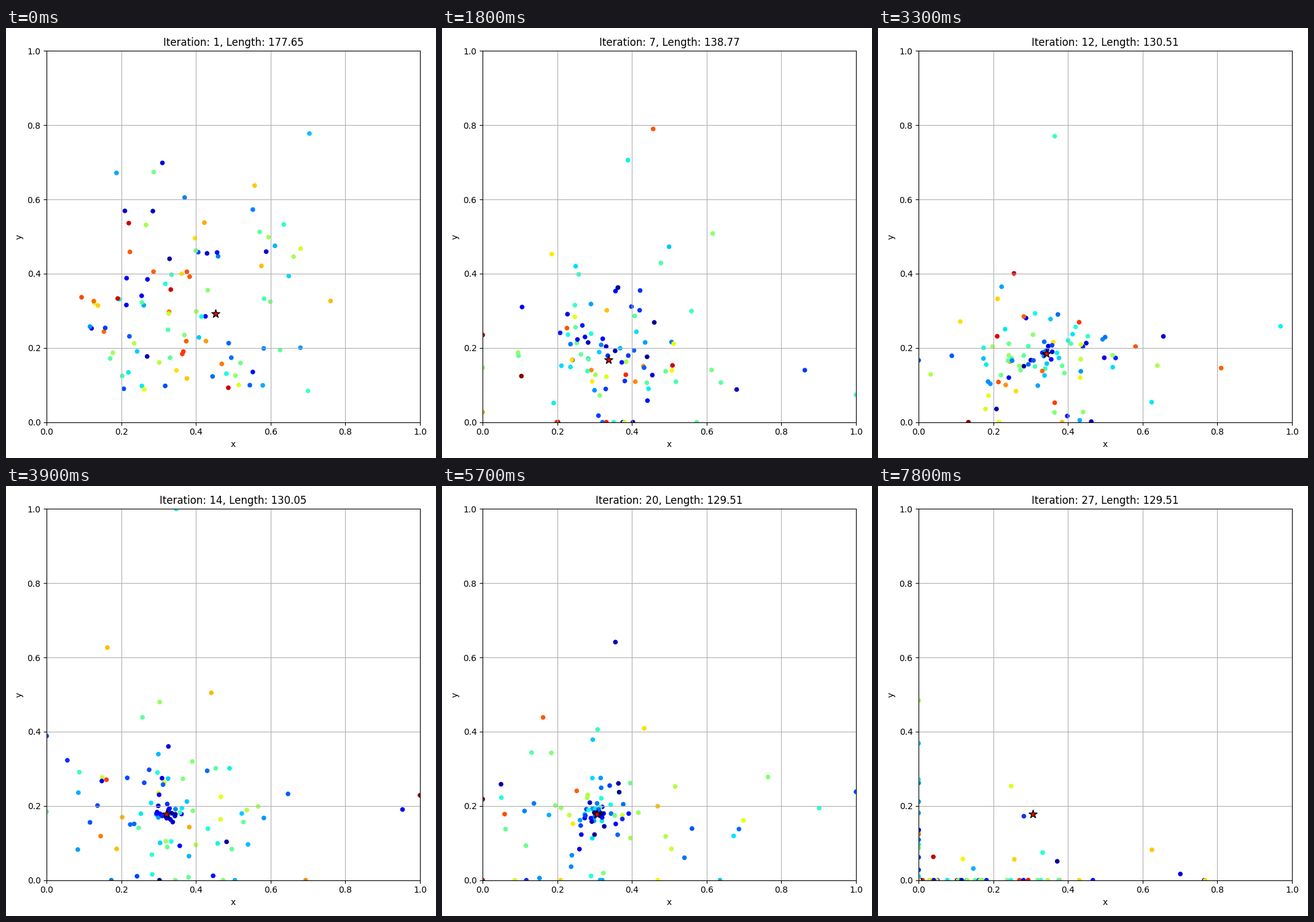
These frames come from a looping animation (700 by 700 pixels, 8 s). A matplotlib script:

```python
import numpy as np
import matplotlib.pyplot as plt
from matplotlib.animation import FuncAnimation

TICK_MS = 100
TICKS = 80
TICKS_PER_STEP = 3
STEPS = 27
POINTS = 100

# Key points of the best solution so far; the values between are interpolated.
KEY_STEPS = [1, 7, 12, 16, 20]
BEST_X = [0.4525, 0.337, 0.341, 0.301, 0.306]
BEST_Y = [0.292, 0.168, 0.185, 0.170, 0.178]
LENGTH = [177.65, 138.77, 130.51, 129.59, 129.51]


def best(step):
    return np.array([np.interp(step, KEY_STEPS, BEST_X),
                     np.interp(step, KEY_STEPS, BEST_Y)])


def first_swarm(rng):
    """Loose starting cloud, denser towards the lower left."""
    x = 0.06 + 0.76 * rng.beta(2.2, 3.2, POINTS)
    y = 0.06 + 0.92 * rng.beta(1.6, 4.4, POINTS)
    return np.column_stack([x, y]), rng.beta(1.4, 2.0, POINTS)


def later_swarm(rng, step):
    """Heavy-tailed cloud around the best point, flung past the border at the end."""
    star = best(step)
    core = np.interp(step, [7, 23], [0.03, 0.25])
    size = np.where(rng.random(POINTS) < core, 0.15, 1)[:, None]
    near = star + rng.standard_t(2.1, (POINTS, 2)) * size * [0.1, 0.075]
    flung = rng.normal([0, -0.13], [0.27, 0.22], (POINTS, 2))
    pull = np.clip((step - 23) / 4, 0, 1)
    xy = near * (1 - pull) + flung * pull

    distance = np.hypot(*(xy - star).T)
    cost = rng.beta(1.4, 2.4, POINTS) * (1 - 0.7 * np.exp(-distance / 0.07))
    return np.clip(xy, 0, 1), cost / cost.max()


def swarm(step):
    rng = np.random.default_rng(100 + step)
    return first_swarm(rng) if step == 1 else later_swarm(rng, step)


def title(step):
    return f"Iteration: {step}, Length: {np.interp(step, KEY_STEPS, LENGTH):.2f}"


fig, ax = plt.subplots(figsize=(7, 7), dpi=100)
positions, costs = swarm(1)
dots = ax.scatter(*positions.T, c=costs, s=20, cmap="jet", vmin=0, vmax=1)
star_mark = ax.scatter(*best(1), s=100, c="red", marker="*", edgecolors="black")
ax.set(xlim=(0, 1), ylim=(0, 1), xlabel="x", ylabel="y", title=title(1))
ax.grid(True)
fig.tight_layout()


def update(tick):
    step = min(tick // TICKS_PER_STEP + 1, STEPS)
    positions, costs = swarm(step)
    dots.set_offsets(positions)
    dots.set_array(costs)
    star_mark.set_offsets([best(step)])
    ax.set_title(title(step))
    return dots, star_mark


anim = FuncAnimation(fig, update, frames=TICKS, interval=TICK_MS,
                     repeat=True, repeat_delay=0)
plt.show()
```
